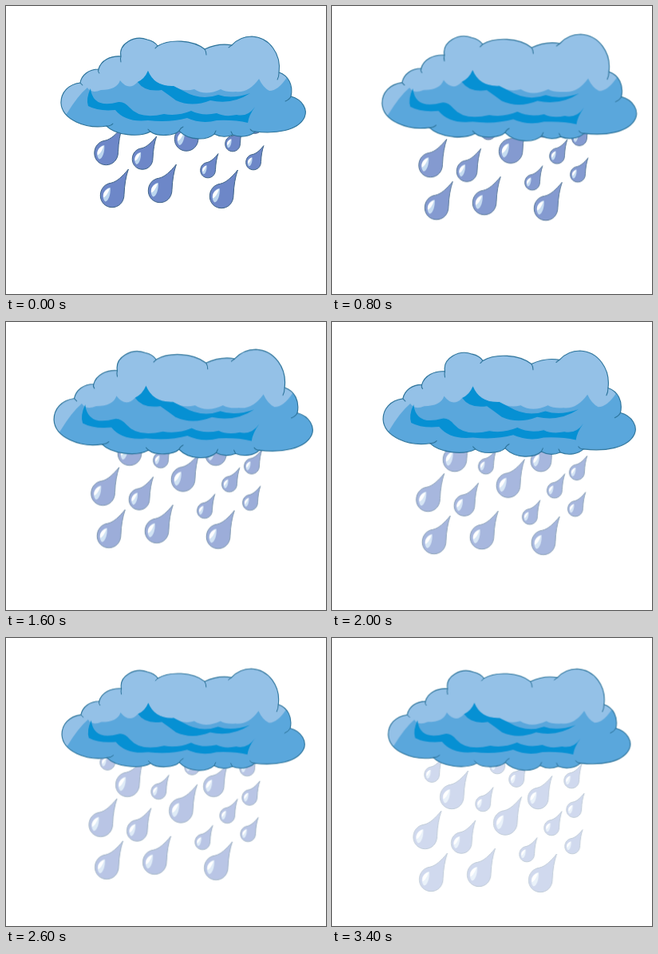
An HTML page for the animation above (3.6 s loop, 401 by 360 pixels).

```html
<!DOCTYPE html>
<html lang="en">
<head>
<meta charset="utf-8">
<title>Rain cloud</title>
<style>
  html, body { margin: 0; width: 100%; height: 100%; overflow: hidden; background: #fff; }
  svg { display: block; width: 100vw; height: 100vh; }
</style>
</head>
<body>
<svg viewBox="0 0 401 360" xmlns="http://www.w3.org/2000/svg">
  <defs>
    <path id="shape" d="M69 121 C69 108 78 98 93 96 C95 86 104 79 116 79
      C119 68 131 62 144 63 C141 47 161 36 177 42 Q186 44 190 50
      C205 41 234 42 249 54 Q266 46 283 49 Q293 38 308 38
      C330 39 345 60 342 83 C354 87 360 99 357 113 C372 117 378 130 374 139
      C366 156 338 160 312 157 C306 163 294 165 284 161 Q272 166 261 160
      C252 168 230 169 217 156 C211 162 190 164 181 157 C166 165 137 161 126 150
      C100 154 70 142 69 121 Z"/>
    <clipPath id="inside"><use href="#shape"/></clipPath>
    <g id="drop">
      <path fill="#6d87c8" stroke="#3f6488" vector-effect="non-scaling-stroke"
        d="M1.36 -2.2 C1.15 -1.6 1.03 -.9 1 -.1 C1 .55 .55 .98 0 .98 S-.98 .55 -.98 0
           C-.98 -.58 -.6 -.98 -.1 -1.05 C.4 -1.15 .85 -1.6 1.36 -2.2 Z"/>
      <path fill="#bcd6ef" d="M-.15 -.67 C-.7 -.6 -.95 .15 -.58 .5 C-.3 .5 -.1 -.2 -.15 -.67 Z"/>
      <path fill="#fff" d="M-.2 -.62 C-.6 -.5 -.8 -.2 -.72 .15 C-.5 .1 -.3 -.3 -.2 -.62 Z"/>
    </g>
  </defs>
  <g id="rain"></g>
  <g id="cloud" stroke-linecap="round" stroke-linejoin="round">
    <use href="#shape" fill="#5aa7dc"/>
    <g clip-path="url(#inside)">
      <path fill="#94c1e7" d="M60 30 H352 V89 Q341 106 330 106 Q322 102 317 91 Q304 109 288 107
        Q276 108 269 104 Q250 113 236 104 Q222 108 210 100 Q186 101 178 81
        Q173 92 165 95 Q154 107 143 93 Q139 105 119 105 Q107 110 102 102 Q90 112 76 135 H60 Z"/>
      <path fill="#0690d3" d="M178 81 Q174 91 165 95 Q174 108 195 105 Q205 112 213 118
        Q233 127 256 118 Q283 124 306 109 Q283 117 266 111 Q244 119 222 106 L210 100 Q186 101 178 81 Z"/>
      <path fill="#0690d3" d="M106 103 Q100 116 103 125 Q116 132 137 130 Q150 146 178 143
        Q205 146 227 140 Q245 148 264 143 Q286 142 303 146 Q304 137 312 126 Q303 139 289 136
        Q274 139 264 134 Q246 138 232 131 Q215 138 198 135 Q168 142 155 127 Q148 119 141 120
        Q109 129 106 103 Z"/>
    </g>
    <g fill="none" stroke="#2b7299">
      <use href="#shape" stroke-width="1.1"/>
      <path d="M93 96 l3 3 M116 79 q-1 3 1 5 M144 63 q-1 3 0 7 M190 50 l-3 3 M249 54 q2 3 2 7
        M283 49 l-4 3 M342 83 q0 5 -2 9 M357 113 q-2 4 -7 6 M126 150 q5 0 8 -3
        M181 157 l-3 -3 M217 156 q2 -4 5 -5 M261 160 l2 -4 M284 161 l-2 -4 M312 157 q-4 0 -6 -3"/>
    </g>
  </g>
</svg>
<script>
const LOOP = 3600, STEP = 200;
const rain = document.getElementById("rain");
const cloud = document.getElementById("cloud");

// starting centres, grouped by radius
const drops = {
  15: [[133, 237], [193, 231], [270, 238], [125.5, 184], [226, 166.5], [159, 134]],
  13: [[171, 191.5], [267, 136]],
  9.5: [[253, 205.5], [310, 195.5], [284, 172.5], [312, 150], [198, 142.5],
        [309, 113.5], [240, 112], [134, 106], [216, 95.5]]
};

function addDrop(x, y, r) {
  const use = document.createElementNS(rain.namespaceURI, "use");
  use.setAttribute("href", "#drop");
  use.setAttribute("transform", `translate(${x} ${y}) scale(${r})`);
  rain.append(use);
}

// grows for half the loop, shrinks a little faster, then rests
function cloudScale(k) {
  const j = (k + 2) % 18;
  return Math.min(300 + 3.1 * j, Math.max(300, 328 - 4 * (j - 9))) / 306;
}

function draw(ms) {
  const k = Math.floor((ms % LOOP) / STEP);
  cloud.setAttribute("transform", `translate(222 101) scale(${cloudScale(k)}) translate(-222 -101)`);
  rain.setAttribute("transform", `translate(${-.52 * k} ${3.82 * k})`);
  rain.setAttribute("opacity", 1 - .04 * k);
}

for (const r in drops) drops[r].forEach(([x, y]) => addDrop(x, y, r));
const start = performance.now();
function tick() {
  draw(performance.now() - start);
  requestAnimationFrame(tick);
}
tick();
</script>
</body>
</html>
```
